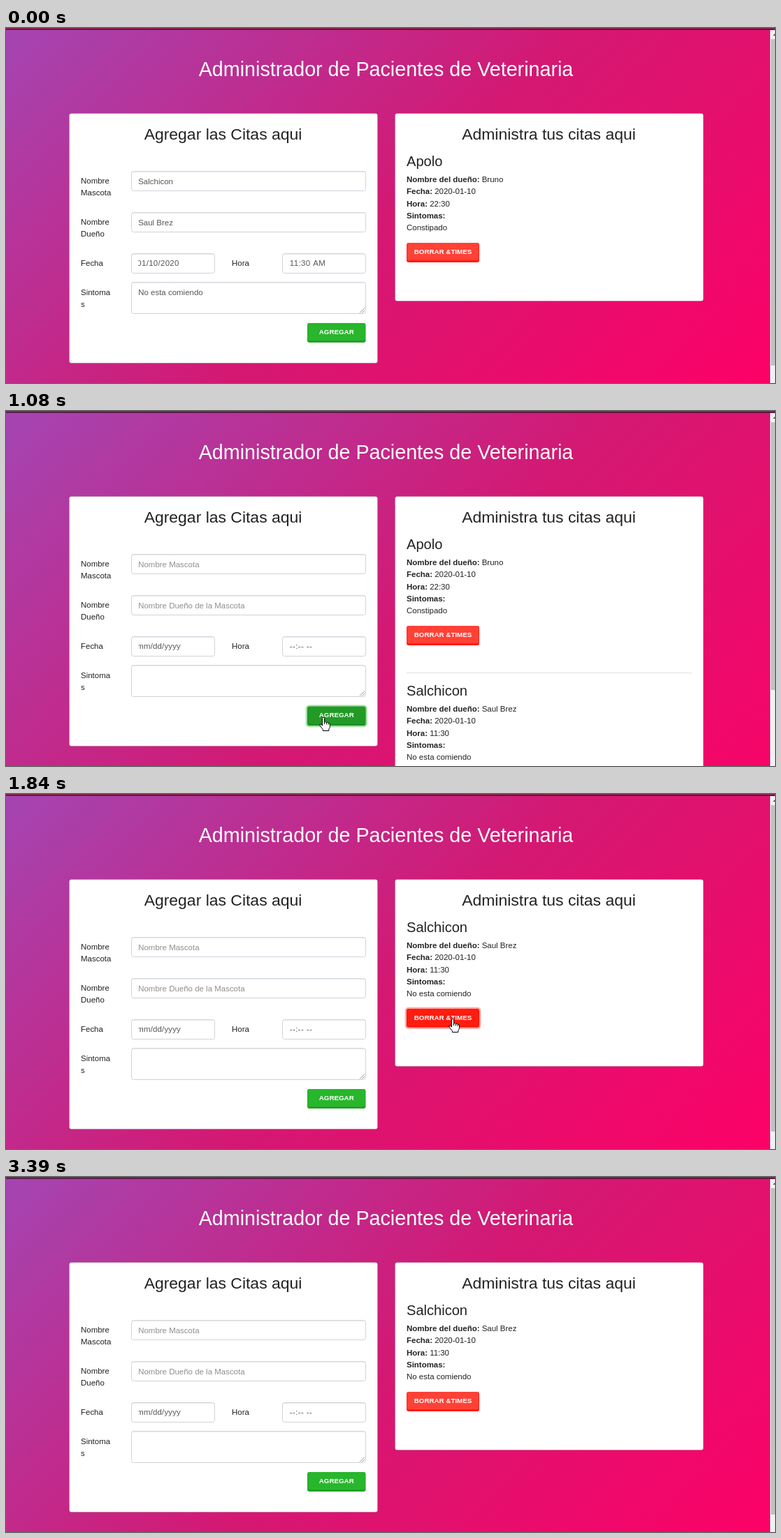
Write an HTML page with a canvas that moves like this. It is 1100 px wide and 509 px high and loops after 3470 ms.

```html
<!DOCTYPE html>
<html lang="es">
<head>
<meta charset="utf-8">
<title>Administrador de Pacientes</title>
<style>
  html, body { margin: 0; width: 100%; height: 100%; overflow: hidden; }
  canvas { display: block; width: 1100px; height: 509px; }
</style>
</head>
<body>
<canvas id="stage" width="1100" height="509"></canvas>
<script>
const ctx = document.getElementById('stage').getContext('2d');
const LOOP = 3470;
const FONT = '"Liberation Sans", Arial, sans-serif';
const INK = '#222', FIELD_INK = '#555', HINT = '#8f8f8f';
const PETS = [
  { name: 'Apolo', owner: 'Bruno', time: '22:30', symptoms: 'Constipado' },
  { name: 'Salchicon', owner: 'Saul Brez', time: '11:30', symptoms: 'No esta comiendo' }
];
const GREEN = { rest: '#28b62c', hover: '#229a25', active: '#1f8c22', edge: '#23a127', darkEdge: '#1f8c22', ring: 'rgba(72,193,76,.5)' };
const RED = { rest: '#ff4136', hover: '#ff1c10', active: '#ff1c10', edge: '#ff1c10', darkEdge: '#f50f00', ring: 'rgba(255,94,84,.55)' };

const between = (t, a, b) => t >= a && t < b;

function text(str, x, y, { size = 11.47, color = INK, bold = false, align = 'left', spacing = 0 } = {}) {
  ctx.font = `${bold ? 'bold ' : ''}${size}px ${FONT}`;
  ctx.fillStyle = color;
  ctx.textAlign = align;
  ctx.letterSpacing = spacing + 'px';
  ctx.fillText(str, x, y);
  return ctx.measureText(str).width;
}

function box(x, y, w, h, r, fill, stroke) {
  ctx.beginPath();
  ctx.roundRect(x, y, w, h, r);
  ctx.fillStyle = fill;
  ctx.fill();
  if (!stroke) return;
  ctx.strokeStyle = stroke;
  ctx.lineWidth = 1;
  ctx.stroke();
}

function background(pageHeight, thumbEnd) {
  const span = (1093 + pageHeight) / 2;
  const cx = 1093 / 2, cy = 3 + pageHeight / 2;
  const g = ctx.createLinearGradient(cx - span / 2, cy - span / 2, cx + span / 2, cy + span / 2);
  g.addColorStop(0, '#a445b2');
  g.addColorStop(0.5, '#d41872');
  g.addColorStop(1, '#ff0066');
  ctx.fillStyle = g;
  ctx.fillRect(0, 0, 1100, 509);

  ctx.fillStyle = '#f1f1f1';
  ctx.fillRect(1093, 3, 7, 506);
  ctx.fillStyle = '#c1c1c1';
  ctx.fillRect(1094, 16, 6, thumbEnd - 16);
  ctx.fillStyle = '#505050';
  ctx.beginPath();
  ctx.moveTo(1097, 11);
  ctx.lineTo(1100, 8);
  ctx.lineTo(1100, 11);
  ctx.fill();

  ctx.fillStyle = '#a32e58';
  ctx.fillRect(0, 0, 1100, 1);
  ctx.fillStyle = '#4d1230';
  ctx.fillRect(0, 1, 1100, 1.6);
}

function card(x, bottom, title) {
  box(x + 0.5, 122.5, 441, bottom - 122.5, 3, '#fff', 'rgba(0,0,0,.125)');
  text(title, x + 220.5, 160, { size: 22.94, align: 'center' });
}

function field(x, y, w, h) {
  box(x + 0.5, y + 0.5, w - 1, h - 1, 3, '#fff', '#ced4da');
  ctx.fillStyle = 'rgba(0,0,0,.06)';
  ctx.fillRect(x + 1, y + 1, w - 2, 1.4);
}

function button(label, x, y, w, theme, { hover, active, focus, sinks }) {
  const drop = active ? 1.43 : hover ? 0.72 : 0;
  const top = y + (sinks ? drop : 0);
  const bottom = y + 28 - (sinks ? 0 : drop);
  const lit = hover || focus || active;
  if (focus) box(x - 2.3, top - 2.3, w + 4.6, bottom - top + 4.6, 5, theme.ring);
  box(x, top, w, bottom - top, 3, lit ? theme.darkEdge : theme.edge);
  const fill = active ? theme.active : lit ? theme.hover : theme.rest;
  box(x + 0.7, top, w - 1.4, bottom - top - 2.9 + drop, 2.5, fill);
  text(label, x + w / 2, top + 15.7, { size: 9.78, color: '#fff', bold: true, align: 'center' });
}

function clippedText(str, x, y, left, right, style) {
  ctx.save();
  ctx.beginPath();
  ctx.rect(left, y - 12, right - left, 18);
  ctx.clip();
  text(str, x, y, style);
  ctx.restore();
}

function form(filled, state) {
  card(90, 480.5, 'Agregar las Citas aqui');
  [['Nombre', 223], ['Mascota', 240.3], ['Nombre', 282], ['Dueño', 299.3],
   ['Fecha', 341], ['Sintoma', 382.5], ['s', 399.7]].forEach(([s, y]) => text(s, 107, y));
  text('Hora', 323, 341);

  field(179, 205, 336, 29);
  field(179, 264, 336, 29);
  field(179, 323, 120, 29);
  field(395, 323, 120, 29);
  field(179, 364, 336, 46);

  const ink = { color: filled ? FIELD_INK : HINT };
  text(filled ? PETS[1].name : 'Nombre Mascota', 189.2, 224, ink);
  text(filled ? PETS[1].owner : 'Nombre Dueño de la Mascota', 189.2, 283, ink);
  const date = filled ? '01/10/2020' : 'mm/dd/yyyy';
  clippedText(date, 187.3, 341, 189.3, 250, { color: FIELD_INK, spacing: filled ? 0.3 : 0.15 });
  text(filled ? '11:30 AM' : '--:-- --', 405.7, 341, { color: FIELD_INK, spacing: 0.4 });
  if (filled) text(PETS[1].symptoms, 189.2, 382.5, ink);

  ctx.strokeStyle = '#777';
  ctx.lineWidth = 0.8;
  ctx.beginPath();
  for (const d of [7, 3.5]) {
    ctx.moveTo(513 - d, 408.5);
    ctx.lineTo(513, 408.5 - d);
  }
  ctx.stroke();

  button('AGREGAR', 431, 423, 83.5, GREEN, { ...state, sinks: true });
}

function appointment(pet, dy, state) {
  text(pet.name, 573, 197.7 + dy, { size: 20.07 });
  const rows = [['Nombre del dueño:', pet.owner], ['Fecha:', '2020-01-10'], ['Hora:', pet.time], ['Sintomas:', '']];
  rows.forEach(([label, value], i) => {
    const y = 221.2 + dy + i * 17.2;
    const w = text(label, 573, y, { bold: true });
    text(value, 573 + w + 3.2, y);
  });
  text(pet.symptoms, 573, 290 + dy);
  button('BORRAR &TIMES', 573, 308 + dy, 104, RED, state);
}

function list(pets, state) {
  const shift = state.hover || state.active ? -1 : 0;
  card(556, (pets.length > 1 ? 601.5 : 391.5) + shift, 'Administra tus citas aqui');
  appointment(pets[0], 0, state);
  if (pets.length < 2) return;
  ctx.fillStyle = '#e1e1e1';
  ctx.fillRect(573, 375 + shift, 408, 1);
  appointment(pets[1], 210 + shift, {});
}

// Pointer position advances in a few discrete hops.
function glide(t, start, hopTime, hops, from, to, ease) {
  const hop = Math.min(hops, Math.floor((t - start) / hopTime + 0.02));
  const p = ease(hop / hops);
  return from.map((v, i) => v + (to[i] - v) * p);
}
const easeOut = u => 1 - (1 - u) ** 2;
const easeIn = u => u * u;
const smooth = u => u * u * (3 - 2 * u);

function pointer(t) {
  const entry = [341, 499], add = [449, 438], rest = [454, 439], remove = [639, 322], exit = [622, 512];
  if (t < 220 || t >= 2530) return null;
  if (t < 1080) return glide(t, 220, 76.7, 6, entry, add, easeOut);
  if (t < 1370) return rest;
  if (t < 2090) return glide(t, 1370 - 78, 78, 5, rest, remove, smooth);
  return glide(t, 2090 - 73, 73.3, 6, remove, exit, easeIn);
}

const inside = (p, x, y, w, h) => !!p && p[0] >= x && p[0] <= x + w && p[1] >= y && p[1] <= y + h;

function drawPointer([x, y], hand) {
  const arrow = 'M0 0V16L3.7 12.6L6.2 18.3L8.6 17.2L6.2 11.7H11.3Z';
  const fist = 'M-1.6 1.4Q0 -.8 1.6 1.4V7Q3.4 5.8 4.4 7.6Q6.2 6.6 7 8.4Q9.4 7.6 9.4 10V13.5Q9 16 7.8 17V19.5H-.6V17.8L-5 12Q-5.6 10 -3.8 10L-1.6 12Z';
  const shape = new Path2D(hand ? fist : arrow);
  ctx.save();
  ctx.translate(x, y);
  ctx.fillStyle = '#fff';
  ctx.strokeStyle = '#000';
  ctx.lineWidth = 1;
  ctx.lineJoin = 'round';
  ctx.fill(shape);
  ctx.stroke(shape);
  if (hand) ctx.stroke(new Path2D('M1.6 7V10M4.4 7.8V10.4M7 8.6V10.8'));
  ctx.restore();
}

function clickSpot([x, y]) {
  ctx.fillStyle = 'rgba(255,165,0,.75)';
  ctx.beginPath();
  ctx.arc(x, y - 0.5, 10, 0, Math.PI * 2);
  ctx.fill();
}

function draw(t) {
  const both = between(t, 1080, 1840);
  const pets = both ? PETS : t < 1080 ? PETS.slice(0, 1) : PETS.slice(1);
  const p = pointer(t);
  const overAdd = inside(p, 431, 423, 84, 28);
  const overRemove = inside(p, 573, 308, 104, 28);

  background(both ? 674 : 553, both ? 400 : 484);
  text('Administrador de Pacientes de Veterinaria', 543.5, 69, { size: 28.68, color: '#fff', align: 'center' });
  form(t < 1080, { hover: overAdd, active: between(t, 900, 1080), focus: between(t, 980, 1840) });
  list(pets, { hover: overRemove, active: between(t, 1750, 2090), focus: between(t, 1840, 3390) });

  if (!p) return;
  if (between(t, 900, 980) || between(t, 1750, 1840)) clickSpot(p);
  drawPointer(p, overAdd || overRemove);
}

const began = performance.now();
function tick() {
  draw((performance.now() - began) % LOOP);
  requestAnimationFrame(tick);
}
tick();
</script>
</body>
</html>
```
